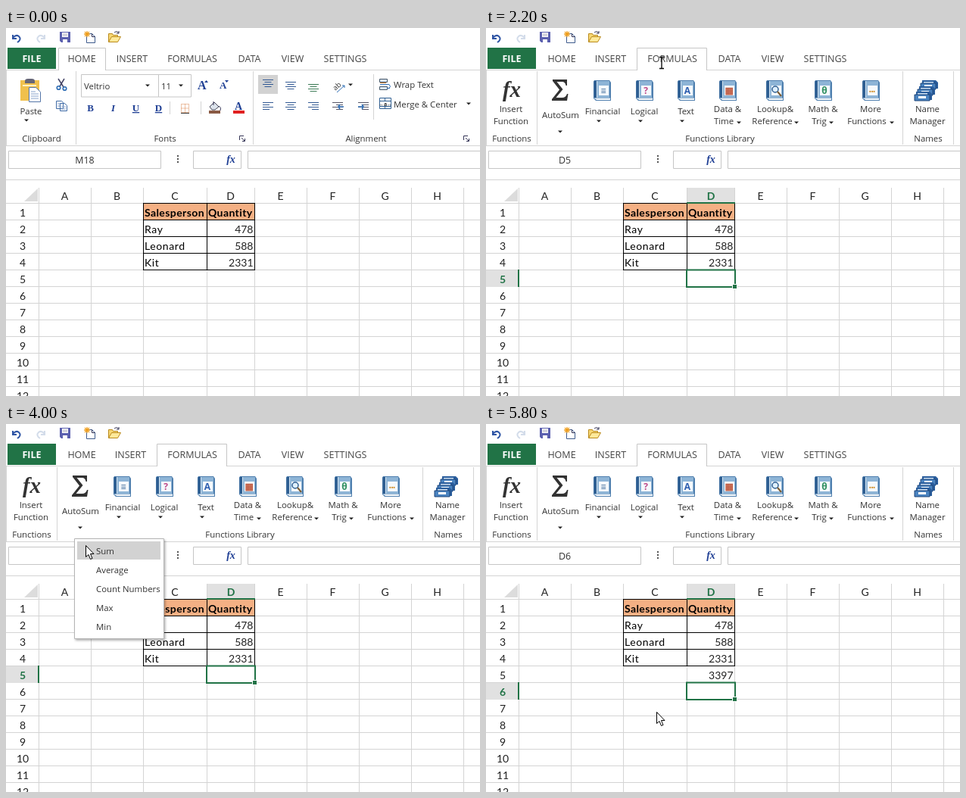
Recreate the animation shown at these times as an HTML page. Size 626 by 486 pixels, loop 6000 ms.

```html
<!DOCTYPE html>
<html lang="en">
<head>
<meta charset="utf-8">
<title>Summing a column</title>
<style>
  html, body { margin: 0; width: 100%; height: 100%; overflow: hidden; background: #fff; }
  svg { display: block; width: 626px; height: 486px; }
  text { font: 11.4px "Open Sans", sans-serif; fill: #333; white-space: pre; }
  .mid { text-anchor: middle; }
  .end { text-anchor: end; }
  .tab { font-size: 12.5px; fill: #444; }
  .bar { font-size: 12.4px; }
  .grid { font: 14px Lato, sans-serif; fill: #222; }
  .cell { letter-spacing: .6px; fill: #000; }
  .head { font-weight: 700; letter-spacing: .4px; fill: #000; }
  .on { font-weight: 700; fill: #217346; }
  .serif { font-family: "Liberation Serif", serif; }
  .blue { font-weight: 700; fill: #1f3f94; }
  .line { fill: none; stroke: #d4d4d4; }
  .box { fill: #fff; stroke: #c6c6c6; }
  .ink { fill: none; stroke: #000; }
  .thin { stroke: #335; fill: none; }
  .tip { fill: #222; }
  .step { visibility: hidden; }
</style>
</head>
<body>
<svg id="stage" viewBox="0 0 626 486">
  <defs>
    <path id="drop" class="tip" d="M-3-1.5h6l-3 3z"/>
    <g id="launch" class="thin" stroke="#666">
      <path d="M.5 6V.5H6M3 3l4 4M7.5 4v3.500H4"/>
    </g>
    <g id="book">
      <path d="M2 1h20l2 3v24H4L1 25V3z" fill="#4f7fae"/>
      <path d="M3 25h20v2H5z" fill="#fff"/>
      <path d="M1.500 2h4v22h-4z" fill="#2f5f92"/>
      <path d="M6 2h16v22H6z" fill="#8db4d6"/>
      <path d="M8 8h13v13H8z" fill="#f5f9fc"/>
      <path d="M5.500 2v22M2 25h21" stroke="#d7e6f2" fill="none"/>
    </g>
    <g id="card">
      <path d="M2 3h18l3 3v8H2z" fill="#2a5d9c"/>
      <path d="M4 5h13v2H4z" fill="#cfe3f6"/>
      <path d="M0 7h20v8H0z" fill="#4a83c0" stroke="#1d4478"/>
      <path d="M5 9h10v3H5z" fill="#fff"/>
    </g>
    <filter id="shade" x="-20%" y="-20%" width="140%" height="150%">
      <feDropShadow dx="1.500" dy="2" stdDeviation="1.500" flood-opacity=".3"/>
    </filter>
  </defs>
  <rect width="626" height="486" fill="#fff"/>

  <!-- quick access -->
  <g id="quick">
    <path d="M9 9v5h5M9 13q4-5 8-2 4 4-2 8" fill="none" stroke="#2f55a4" stroke-width="2"/>
    <path d="M51 9v5h-5M51 13q-4-5-8-2-4 4 2 8" fill="none" stroke="#d3dcea" stroke-width="2"/>
    <path d="M71 5h14v14H73l-2-2z" fill="#5a5fae"/>
    <path d="M74 6h8v6h-8zM75 15h6v4h-6z" fill="#fff"/>
    <path d="M75 8h6M75 10h6" stroke="#aab"/>
    <path d="M106.500 7.500h7l4 4v8h-11z" fill="#fff" stroke="#3d5a8c"/>
    <path d="M113.500 7.500v4h4" class="thin"/>
    <path d="M107 4v8M103 8h8M104 5l6 6M110 5l-6 6" stroke="#f0a020" stroke-width="1.300"/>
    <path d="M135.500 18.500v-11h5l1 2h6v3" fill="#f7d774" stroke="#b98a1c"/>
    <path d="M135.500 18.500l4-7h12l-4 7z" fill="#ffe99a" stroke="#b98a1c"/>
    <path d="M143 6q4-3 6 1m0-3v3h-3" class="thin"/>
  </g>

  <!-- tabs -->
  <path d="M2 26h64v28H2z" fill="#217346"/>
  <text x="34" y="45" class="tab mid" style="fill:#fff;font-weight:700">FILE</text>
  <path class="line" d="M0 55.500H626M0 155.500H626M.5 56V155"/>
  <g id="tabs"></g>

  <!-- home ribbon -->
  <g class="step home">
    <path class="line" d="M92.500 57V154M326.500 57V154M485.500 61V121"/>
    <path d="M69.500 56V26.500H131.500V56" class="box"/>
    <path d="M70 55h61v2H70z" fill="#fff"/>
    <path d="M19 69h25v27H19z" fill="#f0c04c"/>
    <path d="M25 70q0-3 4-3h5q4 0 4 3v3H25z" fill="#667"/>
    <path d="M22 75h18v2H22z" fill="#fff2c4"/>
    <path d="M30.500 78.500h9l6 6v13h-15z" fill="#fff" stroke="#5576a8"/>
    <path d="M33 84h6M33 87h10M33 90h10M33 93h10" stroke="#8aa4cc"/>
    <use href="#drop" x="27" y="122"/>
    <path d="M69 67l7 11M77 67l-6 10" stroke="#446" stroke-width="1.500"/>
    <g fill="none" stroke="#2f6eb5" stroke-width="1.600">
      <circle cx="69.500" cy="79" r="2.300"/><circle cx="77.500" cy="80" r="2.300"/>
    </g>
    <g fill="#fff" stroke="#3f6ba6">
      <path d="M66.500 96.500h7l2 2v8h-9zM71.500 99.500h6l3 3v7h-9z"/>
      <path d="M68 100h3M68 103h3M73 104h6M73 107h6" stroke="#8aa4cc"/>
    </g>
    <path class="box" d="M99.500 61.500H201.500V91H99.500zM201.500 61.500H244.500V91H201.500z"/>
    <use href="#drop" x="187" y="76"/><use href="#drop" x="231" y="76"/>
    <text x="253" y="81" class="serif blue" style="font-size:16px">A</text>
    <text x="282" y="80" class="serif blue" style="font-size:13px">A</text>
    <path d="M262 72l2.500-3 2.500 3zM289 69h5l-2.500 3z" fill="#1f3f94"/>
    <g class="serif blue" id="styles"></g>
    <path class="line" d="M216.500 97V114M257.500 97V114"/>
    <path d="M231.500 100.500h10v11h-10zM236.500 100.500v11M231.500 106h10" fill="none" stroke="#d9824a" stroke-dasharray="1 1"/>
    <path d="M231 112.500h11" stroke="#333"/>
    <path d="M269 104l6-6 6 6-5 4h-4z" fill="#dce3ec" stroke="#445"/>
    <path d="M274 97v5M281 103q4 2 2 6" class="thin"/>
    <path d="M268 109h15v4h-15z" fill="#8a5a44"/>
    <text x="307" y="108" class="serif blue mid" style="font-size:14px">A</text>
    <path d="M300 109h15v4h-15z" fill="#e02020"/>
    <use href="#launch" x="308" y="142"/><use href="#launch" x="604" y="142"/>
    <path d="M333 62h26v25h-26z" fill="#d2d2d2"/>
    <g id="aligns"></g>
    <text transform="translate(435 83) rotate(-42)" style="font-size:9.500px">ab</text>
    <path d="M437 85l10-9m-3 0h3v3" fill="none" stroke="#2f6eb5"/>
    <use href="#drop" x="455" y="75"/><use href="#drop" x="611" y="100"/>
    <path d="M493.500 67.500h10v4h-10zM493.500 77.500h10v4h-10z" fill="#dbe8f7" stroke="#456"/>
    <path d="M494 74.500h12q3 3 0 5m-3 0h4" fill="none" stroke="#2f6eb5"/>
    <path d="M494 72.500h8" stroke="#d08030"/>
    <path d="M493.500 92.500h15v14h-15zM493.500 96.500h15M493.500 103.500h15M500.500 92.500v4M500.500 103.500v3" fill="#fff" stroke="#2f5f92"/>
    <text x="501" y="102.500" class="mid" style="font-size:7px;font-weight:700">↔a↔</text>
  </g>

  <!-- formulas ribbon -->
  <g class="step formulas">
    <path class="line" d="M67.500 57V154M550.500 57V154M617.500 57V154"/>
    <path d="M199.500 56V26.500H291.500V56" class="box"/>
    <path d="M200 55h91v2H200z" fill="#fff"/>
    <path class="step hover" d="M74 58h50v64H74z" fill="#d2d2d2"/>
    <text x="34" y="91" class="serif mid" style="font-size:29px;font-style:italic;font-weight:700">fx</text>
    <path d="M88 68h19v8h-1.500q-1-5-5-5h-7l8 10-9 11h8q5 0 6.500-5h1.500l-1.500 9H87v-2l10-12.500L88 70z" fill="#333"/>
    <use href="#drop" x="98" y="137"/>
    <g id="books"></g>
    <use href="#card" x="574" y="66"/><use href="#card" x="570" y="74"/><use href="#card" x="566" y="81"/>
  </g>
  <g id="labels"></g>

  <!-- formula bar -->
  <path class="box" d="M3.500 162.500H204.500V185.500H3.500zM247.500 162.500H310.500V185.500H247.500zM319.500 162.500H630V185.500H319.500z"/>
  <path d="M226 168h2v2h-2zM226 172h2v2h-2zM226 176h2v2h-2z" fill="#555"/>
  <text x="297" y="178" class="serif blue mid" style="font-size:14px;font-style:italic">fx</text>
  <path class="line" d="M0 200.500H626"/>

  <g id="sheet"></g>

  <!-- formula being edited -->
  <g class="step edit">
    <path d="M266 254.500h61v65h-61z" fill="#1010d0" fill-opacity=".1" stroke="#0a0ab8" stroke-width="2"/>
    <path d="M264 252h5v5h-5zM324 252h5v5h-5zM264 316h5v5h-5zM324 316h5v5h-5z" fill="#0a0ab8"/>
    <path d="M326 341h5v3h-5z" fill="#217346"/>
    <path d="M265 319h93v23h-93z" fill="#fff" stroke="#4b8fd0" stroke-width="1.500" filter="url(#shade)"/>
    <path d="M311 321h41v19h-41z" fill="#2f86d8"/>
    <text x="267" y="336" class="grid">=SUM(<tspan fill="#fff">D2:D4</tspan>)</text>
    <text x="323" y="179" class="bar">=SUM(<tspan fill="#3030c8">D2:D4</tspan>)</text>
  </g>

  <!-- function menu -->
  <g class="step menu">
    <path d="M90.500 151.500h118v132h-118z" fill="#fff" stroke="#b4b4b4" filter="url(#shade)"/>
    <path class="step pick" d="M94 155h110v24H94z" fill="#d2d2d2"/>
    <g id="items"></g>
  </g>

  <!-- pointers, hot spot at 0,0 -->
  <g id="pointer" class="step shown">
    <path class="step arrow" d="M.5.500V15.500L4 12.500 6.500 18.500 9 17.500 6.500 11.500H11z" fill="#fff" stroke="#000"/>
    <path class="step beam" d="M-3-7.500h2.500l.5.500.5-.5H3M0-7V7M-3 7.500h2.500L0 7l.5.500H3" fill="none" stroke="#000" stroke-width="1.300"/>
    <path class="step hand" d="M-1.500 1.500q1.500-2 3 0v6q1.500-1.500 3 0 1.500-1 3 .5 2-.5 2.500 1.500v6l-2 5h-7l-5.500-8q0-2 1.500-2l1.500 1.500z" fill="#fff" stroke="#000"/>
  </g>
</svg>

<script>
const LOOP = 6000;
const $ = id => document.getElementById(id);
const text = (x, y, s, cls = "") => `<text x="${x}" y="${y}" class="${cls}">${s}</text>`;
const group = (cls, body) => `<g class="step ${cls}">${body}</g>`;
const path = (d, attrs) => `<path d="${d}" ${attrs}/>`;

// Tabs and ribbon labels
const tabs = insertX => [["HOME", 100], ["INSERT", insertX], ["FORMULAS", 246], ["TAB", 0],
  ["DATA", 321.5], ["VIEW", 378.5], ["SETTINGS", 448]]
  .filter(([, x]) => x).map(([s, x]) => text(x, 45, s, "tab mid")).join("");
$("tabs").innerHTML = "";

const mids = list => list.map(([x, y, s]) => text(x, y, s, "mid")).join("");
const homeText = tabs(166.5) + mids([[33, 114, "Paste"], [47, 150, "Clipboard"],
  [210, 150, "Fonts"], [475.5, 150, "Alignment"]]) +
  text(103, 81, "Veltrio") + text(205, 81, "11") +
  text(512, 79, "Wrap Text") + text(512, 105, "Merge &amp; Center");
const formulaText = tabs(164.5) + mids([
  [33, 111, "Insert"], [33, 127, "Function"], [34, 150, "Functions"], [98.5, 119, "AutoSum"],
  [154, 114, "Financial"], [209, 114, "Logical"], [264, 114, "Text"],
  [319, 111, "Data &amp;"], [314, 127, "Time"], [382, 111, "Lookup&amp;"], [378, 127, "Reference"],
  [445, 111, "Math &amp;"], [440, 127, "Trig"], [508, 111, "More"], [503, 127, "Functions"],
  [583, 111, "Name"], [583, 127, "Manager"], [309, 150, "Functions Library"], [584, 150, "Names"]]);
$("labels").innerHTML = group("home", homeText) + group("formulas", formulaText);

$("styles").innerHTML = ["font-weight:700", "font-style:italic", "text-decoration:underline",
  "text-decoration:underline double"].map((css, i) =>
  `<text x="${111.5 + i * 30}" y="110" class="serif blue mid" style="font-size:13px;${css}">${"BIUD"[i]}</text>`).join("");

// Alignment icons: stacked strokes, wide and narrow in turn
function strokes(x, y, shift, color = "#335a94") {
  let d = "";
  for (let i = 0; i < 4; i++) {
    const w = i % 2 ? 9 : 14;
    d += `M${x - 7 + (14 - w) * shift} ${y + i * 3 + .5}h${w}`;
  }
  return path(d, `stroke="${color}"`);
}
const indent = (x, dir) => strokes(x, 98, 1, "#556") +
  path(`M${x - 4 * dir - 3} 104h7m${dir > 0 ? "-2-3l2 3-2 3" : "-5-3l-2 3 2 3"}`, 'fill="none" stroke="#2f6eb5" stroke-width="1.6"');
$("aligns").innerHTML = [346, 376, 406].map((x, i) =>
  strokes(x, 68 + i * 3, .5, ["#335a94", "#335a94", "#3b7a55"][i]) + strokes(x, 98, i / 2)).join("") +
  indent(438, -1) + indent(472, 1);

// Function library
const marks = [[153, "≡", "#2f5f92"], [209, "?", "#c04a8a"], [264, "A", "#2f5fb0"], [319, "▦", "#c05a40"],
  [381, "", ""], [445, "θ", "#2f8f60"], [508, "•••", "#d08a20"]];
const drops = [[149, 123], [204, 123], [259, 123], [334, 125], [410, 125], [456, 125], [536, 125]];
$("books").innerHTML = marks.map(([x, s, color], i) =>
  `<use href="#book" x="${x - 12}" y="68"/>` +
  `<text x="${x + 2}" y="87" class="mid" style="font-weight:700;font-size:${s.length > 1 ? 7 : 12}px;fill:${color}">${s}</text>` +
  `<use href="#drop" x="${drops[i][0]}" y="${drops[i][1]}"/>`).join("") +
  '<circle cx="382" cy="81" r="4" fill="#dff0ff" stroke="#2f5f92" stroke-width="1.5"/>' +
  path("M385 84l5 6", 'stroke="#7a5a30" stroke-width="2"');

$("items").innerHTML = ["Sum", "Average", "Count Numbers", "Max", "Min"]
  .map((s, i) => text(119, 172 + i * 25, s)).join("");

// Sheet
const cols = [43, 112, 181, 265, 328, 397, 466, 535, 604];
const rowY = n => 210 + n * 22;
const mark = (n, cls) => group(cls,
  path(`M0 ${rowY(n)}h43v22H0z`, 'fill="#e1e1e1"') +
  path(`M43 ${rowY(n) - 1}v23`, 'stroke="#217346" stroke-width="2"') +
  text(22, rowY(n) + 17, n, "grid mid on") +
  path(`M265 ${rowY(n) - .5}h64v22.500h-64z`, 'fill="none" stroke="#217346" stroke-width="2"') +
  path(`M325 ${rowY(n) + 18}h7v7h-7z`, 'fill="#fff"') +
  path(`M326 ${rowY(n) + 19}h5v5h-5z`, 'fill="#217346"') +
  text(104, 179, "D" + n, "bar mid"));

function sheet() {
  let lines = "M0 231.500H626", out = "";
  cols.forEach((x, i) => {
    lines += `M${x + .5} 211V486`;
    if (i < 8) out += text((x + cols[i + 1]) / 2, 227, "ABCDEFGH"[i], "grid mid");
  });
  for (let n = 1; n <= 12; n++) {
    lines += `M0 ${rowY(n) + 21.5}H626`;
    out += text(22, rowY(n) + 17, n, "grid mid");
  }
  out = path(lines, 'class="line"') + path("M24 229H42V212z", 'fill="#dcdcdc"') + out;
  out += path("M181 232h147v22H181z", 'fill="#f4b084"') +
    text(183, 249, "Salesperson", "grid head") + text(267, 249, "Quantity", "grid head");
  [["Ray", 478], ["Leonard", 588], ["Kit", 2331]].forEach(([name, count], i) => {
    const y = rowY(i + 2) + 17;
    out += text(183, y, name, "grid cell") + text(326.5, y, count, "grid end");
  });
  let border = "M181.500 232V320M265.500 232V320M328.500 232V320";
  for (let n = 1; n <= 5; n++) border += `M181 ${rowY(n) - .5}H329`;
  out += path(border, 'class="ink"');
  out += group("picked", path("M266 211h62v20h-62z", 'fill="#e1e1e1"') +
    path("M265 231h64", 'stroke="#217346" stroke-width="2"') + text(297, 227, "D", "grid mid on"));
  out += group("start", text(104, 179, "M18", "bar mid"));
  out += mark(5, "five") + group("six", text(326.5, 337, 3397, "grid end")) + mark(6, "six");
  return out;
}
$("sheet").innerHTML = sheet();

// Timeline: spans of visibility in ms, and pointer stops
const spans = {
  home: [0, 2200], formulas: [2200, LOOP], start: [0, 1000], picked: [1000, LOOP],
  five: [1000, 5400], six: [5400, LOOP], hover: [2600, 3400], menu: [3200, 4400],
  pick: [3600, 4400], edit: [4400, 5400], shown: [200, LOOP],
  beam: [2000, 2400], hand: [2600, 3400]
};
const stops = [[0, 225, 379], [400, 238, 367], [600, 262, 350], [800, 284, 336], [1000, 290, 331],
  [1400, 284, 290], [1600, 258, 200], [1800, 228, 105], [2000, 210, 47], [2200, 232, 46],
  [2400, 165, 85], [2600, 113, 114], [3000, 103, 130], [3200, 100, 134], [3400, 100, 142],
  [3600, 103, 155], [3800, 105, 160], [4400, 112, 168], [4600, 130, 190], [4800, 147, 210],
  [5200, 165, 250], [5400, 188, 310], [5600, 213, 360], [5800, 225, 380]];
const at = (ms, css) => `${(ms / LOOP * 100).toFixed(3)}%{${css}}`;
const seen = on => `visibility:${on ? "visible" : "hidden"}`;
const play = name => `${name} ${LOOP}ms step-end infinite`;

let css = "";
for (const [name, [from, to]] of Object.entries(spans)) {
  css += `@keyframes ${name}{${at(0, seen(!from))}${from ? at(from, seen(true)) : ""}${at(to, seen(to === LOOP))}}` +
    `.${name}{animation:${play(name)}}`;
}
css += `@keyframes arrow{${[[0, 0], [200, 1], [2000, 0], [2400, 1], [2600, 0], [3400, 1], [LOOP, 1]]
  .map(([ms, on]) => at(ms, seen(on))).join("")}}.arrow{animation:${play("arrow")}}`;
css += `@keyframes travel{${stops.map(([ms, x, y]) => at(ms, `transform:translate(${x}px,${y}px)`)).join("")}}` +
  `#pointer{animation:${play("shown")},${play("travel")}}`;
const style = document.createElement("style");
style.textContent = css;
document.head.append(style);
</script>
</body>
</html>
```
